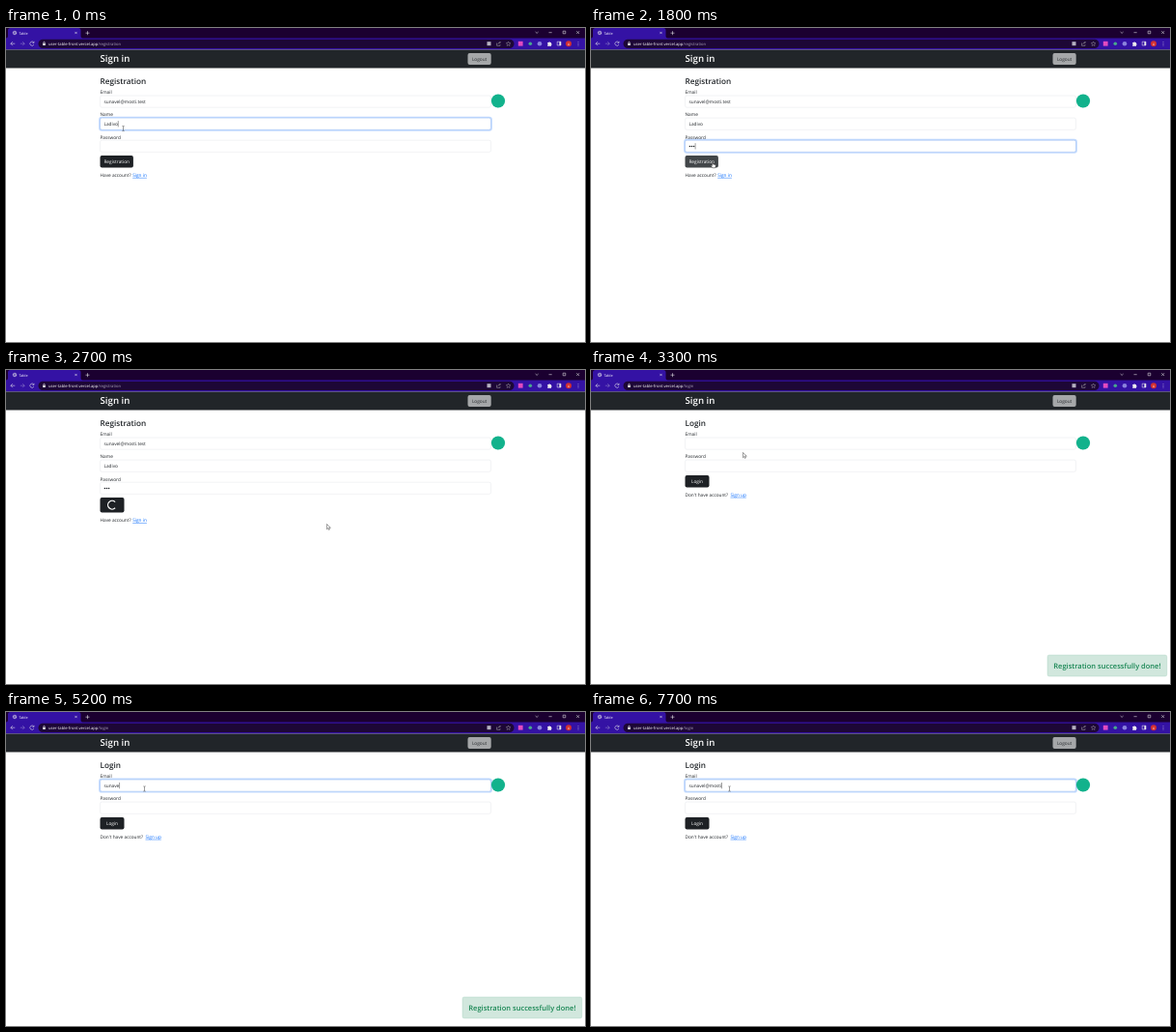
Recreate the animation shown at these times as an HTML page. Size 600 px wide and 325 px high, loop 8 s.

```html
<!DOCTYPE html>
<html lang="en">
<head>
<meta charset="utf-8">
<title>Table</title>
<style>
  html, body { margin: 0; width: 100%; height: 100%; overflow: hidden; background: #fff; }
  svg { display: block; width: 100vw; height: 100vh; }
  text { font-family: "Open Sans", "Noto Sans", sans-serif; font-size: 4.75px; fill: #212529; text-rendering: geometricPrecision; white-space: pre; }
  .title { font-size: 8.2px; font-weight: 600; }
  .white { fill: #fff; }
  .link { fill: #0d6efd; text-decoration: underline; }
  .icon { fill: none; stroke: #eee; stroke-width: .55; }
</style>
</head>
<body>
<svg viewBox="0 0 600 325">
  <!-- Browser window -->
  <rect width="600" height="11" fill="#1b0030"/>
  <path d="M0 10.5Q2 10.5 2 8.5V2.5Q2 0 4.5 0H75Q77.5 0 77.5 2.5V8.5Q77.5 10.5 79.5 10.5H600V22.5H0Z" fill="#3412a4"/>
  <rect x="33.5" y="11.7" width="493" height="9.4" rx="4.7" fill="#1d0736"/>
  <g class="icon">
    <circle cx="9" cy="5" r="1.8"/>
    <path d="M7.4 4.6L9 5.2 9.6 3.6M8.8 6.6L9.8 5.4 10.8 5.4"/>
    <path d="M71.4 3.9l2.2 2.2m0-2.2l-2.2 2.2M82.5 5.2h4m-2-2v4"/>
    <path d="M548.6 4l1.5 1.4L551.600 4M562.500 4.700h3.200M577.200 3.200h2.600v2.600h-2.600zM591.300 3.200l2.800 2.800m0-2.800l-2.800 2.800"/>
    <path d="M9.300 16.200h-4.400m2-2l-2 2 2 2"/>
    <path d="M14.800 16.200h4.400m-2-2l2 2-2 2" opacity=".5"/>
    <path d="M28.700 15a2.100 2.100 0 1 0 .2 2M29 13.800v1.600h-1.600"/>
    <path d="M38.700 15.800v-.7a.8.8 0 0 1 1.600 0v.7"/>
    <path d="M508.600 15.500v2.800h3.400v-1.200M509.800 16.700q.2-1.800 2.600-1.800m-1-1l1 1-1 1" stroke="#aaa"/>
    <path d="M520.600 14l.7 1.500 1.600.2-1.200 1.100.3 1.600-1.400-.8-1.400.8.3-1.600-1.200-1.100 1.600-.2z" stroke="#bbb" stroke-width=".4"/>
    <path d="M571.200 14.200h3.800v3.800h-3.800z"/>
  </g>
  <path d="M38.200 15.700h2.600v2.200h-2.600zM561.200 15h1.200a.7.700 0 0 1 1.400 0h1.200v1.200a.7.700 0 0 1 0 1.400v1.100h-3.800v-1.200a.7.700 0 0 0 0-1.300zM573.400 14.200h1.600v3.800h-1.600z" fill="#eee"/>
  <rect x="498.500" y="14.200" width="4" height="4" fill="#b5b0c0"/>
  <rect x="530.800" y="13.800" width="4.800" height="4.800" fill="#e34bc0"/>
  <circle cx="543.300" cy="16.200" r="1.800" fill="#48a88c"/>
  <circle cx="553" cy="16.200" r="2.300" fill="#8a83dc"/>
  <circle cx="583" cy="16.200" r="3" fill="#d3302f"/>
  <text x="583" y="17.500" class="white" text-anchor="middle" style="font-size:3.400px">A</text>
  <g fill="#eee"><circle cx="593" cy="14.400" r=".45"/><circle cx="593" cy="16.200" r=".45"/><circle cx="593" cy="18" r=".45"/></g>
  <text x="13.500" y="6.500" class="white" style="font-size:3.700px">Table</text>

  <!-- Page header -->
  <rect y="22.500" width="600" height="19" fill="#212529"/>
  <text x="97.500" y="34.500" class="title white" style="font-size:9.700px">Sign in</text>
  <rect x="478.500" y="26" width="24.200" height="12" rx="1.900" fill="#a5a7a9"/>
  <text x="490.600" y="33.700" text-anchor="middle" style="fill:#2b2e31">Logout</text>
  <g id="page"></g>
</svg>
<script>
const LOOP = 8000, STEP = 100;
const LEFT = 97.5, WIDTH = 405, FIELD_HEIGHT = 12.2;
const EMAIL = 'sunavel@mosti.test', NAME = 'Ladivo';
const LOGIN_AT = 2900, SUBMIT_AT = 1950;
const KEY_TIMES = [4400, 4600, 4800, 4900, 5100, 5200, 5800, 6200, 6900, 7200, 7300, 7500, 7700];
const DOT_TIMES = [1000, 1300, 1600];
const MOUSE = [ // time, x, y
  [100, 121.5, 104], [600, 170, 122], [950, 200.5, 138.5], [1000, 200.5, 138.5],
  [1600, 126, 138.8], [1900, 126, 138.8], [2700, 332.5, 159.5], [2800, 332.5, 159.5], [3400, 143.5, 79.5]
];
const page = document.getElementById('page');
const ruler = document.createElement('canvas').getContext('2d');

const ramp = (t, start, length = 150) => Math.min(1, Math.max(0, (t - start) / length));
const between = (t, a, b) => t >= a && t < b;
const countUntil = (times, t) => times.filter(time => time <= t).length;
const text = (x, y, content, cls = '', attrs = '') => `<text x="${x}" y="${y}" class="${cls}" ${attrs}>${content}</text>`;

function textWidth(value) {
  ruler.font = '100px "Open Sans", "Noto Sans", sans-serif';
  return ruler.measureText(value).width * 0.0475;
}

function mouseAt(t) {
  const next = MOUSE.findIndex(key => key[0] > t);
  if (next === 0) return MOUSE[0].slice(1);
  if (next < 0) return MOUSE.at(-1).slice(1);
  const [t0, x0, y0] = MOUSE[next - 1], [t1, x1, y1] = MOUSE[next];
  const p = ramp(t, t0, t1 - t0), e = p * p * (3 - 2 * p);
  return [x0 + (x1 - x0) * e, y0 + (y1 - y0) * e];
}

function field(label, y, { value = '', dots = 0, focus = 0, caret = false } = {}) {
  const size = `x="${LEFT}" y="${y}" width="${WIDTH}" height="${FIELD_HEIGHT}" rx="1.8"`;
  const caretX = 101.5 + (dots ? dots * 2.1 : textWidth(value)) + 0.3;
  let out = text(LEFT, y - 1.7, label)
    + `<rect ${size} fill="none" stroke="#0d6efd" stroke-width="2.8" opacity="${focus * 0.25}"/>`
    + `<rect ${size} fill="#fff" stroke="#d8dde2" stroke-width=".35"/>`
    + `<rect ${size} fill="none" stroke="#86b7fe" stroke-width=".4" opacity="${focus}"/>`
    + text(101.5, y + 7.8, value);
  for (let i = 0; i < dots; i++) out += `<circle cx="${102.4 + i * 2.1}" cy="${y + 6.3}" r=".8" fill="#212529"/>`;
  if (caret) out += `<path d="M${caretX} ${y + 3}v6.300" stroke="#111" stroke-width=".4"/>`;
  return out;
}

function button(y, width, height, label, hover) {
  return `<rect x="${LEFT}" y="${y}" width="${width}" height="${height}" rx="1.9" fill="${hover ? '#424649' : '#1e2125'}"/>`
    + text(LEFT + width / 2, y + 7.9, label, 'white', 'text-anchor="middle"');
}

function spinner(t) {
  const angle = (t - SUBMIT_AT) / 750 * 360;
  return `<path d="M3.100 3.100A4.380 4.380 0 1 1 3.100 -3.100" fill="none" stroke="#fff" stroke-width="1.25" transform="translate(110 139.700) rotate(${angle})"/>`;
}

function pointer(x, y, shape) {
  const shapes = {
    beam: '<path d="M-1.100 -2.600H-.3L0 -2.300 .3 -2.600H1.100M0 -2.300V2.300M-1.100 2.600H-.3L0 2.300 .3 2.600H1.100" fill="none" stroke="#222" stroke-width=".45"/>',
    arrow: '<path d="M0 0V5.300L1.250 4.200 2.050 6 2.900 5.600 2.100 3.800H3.800Z" fill="#fff" stroke="#111" stroke-width=".4"/>',
    hand: '<path d="M-.5 .5Q0 -.3 .5 .5V2.300L2.800 2.700Q3.400 2.900 3.300 3.700L2.700 6H-.1L-1.700 3.700Q-1.500 2.900 -.5 3.700Z" fill="#fff" stroke="#111" stroke-width=".4"/>'
  };
  return `<g transform="translate(${x} ${y})">${shapes[shape]}</g>`;
}

function registration(t, hover) {
  const loading = t >= SUBMIT_AT;
  const onPassword = t >= 600;
  return text(LEFT, 58, 'Registration', 'title')
    + field('Email', 70, { value: EMAIL })
    + field('Name', 93.1, { value: NAME, focus: 1 - ramp(t, 550), caret: !onPassword })
    + field('Password', 116.2, {
        dots: countUntil(DOT_TIMES, t),
        focus: ramp(t, 550) - ramp(t, 1850),
        caret: onPassword && t < 1900
      })
    + (loading ? button(132, 25, 15.5, '', false) + spinner(t) : button(132, 34.4, 12.5, 'Registration', hover))
    + text(LEFT, loading ? 157 : 153.9, 'Have account?')
    + text(131.2, loading ? 157 : 153.9, 'Sign in', 'link');
}

function login(t) {
  const toast = ramp(t, 2850) - ramp(t, 6125);
  return text(LEFT, 58, 'Login', 'title')
    + field('Email', 70, {
        value: EMAIL.slice(0, countUntil(KEY_TIMES, t)),
        focus: ramp(t, 3550),
        caret: t >= 3600 && !between(t, 4200, 4400) && !between(t, 6700, 6900)
      })
    + field('Password', 93.1)
    + button(109, 25, 12.5, 'Login', false)
    + text(LEFT, 130.8, "Don't have account?")
    + text(144.5, 130.8, 'Sign up', 'link')
    + `<g opacity="${toast}"><rect x="473" y="295" width="123.800" height="22" rx="1.900" fill="#d1e7dd" stroke="#a3cfbb" stroke-width=".4"/>`
    + text(534.900, 308.800, 'Registration successfully done!', '', 'text-anchor="middle" style="font-size:7.500px;font-weight:600;fill:#198754"')
    + '</g>';
}

function render(t) {
  const onLogin = t >= LOGIN_AT;
  const [x, y] = mouseAt(t);
  const inField = x > LEFT && x < LEFT + WIDTH
    && (onLogin ? [70, 93.1] : [70, 93.1, 116.2]).some(top => between(y, top, top + FIELD_HEIGHT));
  const hover = t < SUBMIT_AT && between(x, LEFT, 132) && between(y, 132, 144.5);
  page.innerHTML = `<text x="44" y="17.700" class="white" style="font-size:4.150px">user-table-front.vercel.app<tspan fill="#aaa2b8">/${onLogin ? 'login' : 'registration'}</tspan></text>`
    + (onLogin ? login(t) : registration(t, hover))
    + '<circle cx="510" cy="75.500" r="7.100" fill="#12b28c"/>'
    + pointer(x, y, inField ? 'beam' : hover ? 'hand' : 'arrow');
}

let shown = -1;
function tick() {
  const t = Math.floor(performance.now() % LOOP / STEP) * STEP;
  if (t !== shown) render(shown = t);
  requestAnimationFrame(tick);
}
tick();
</script>
</body>
</html>
```
